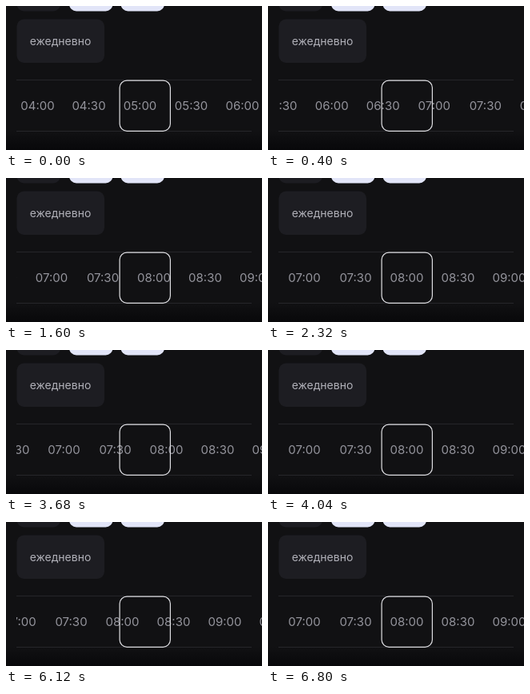
Recreate the animation shown at these times as an HTML page with a canvas. Size 320 px wide and 180 px high, loop 8.76 s.

```html
<!DOCTYPE html>
<html lang="ru">
<head>
<meta charset="utf-8">
<title>Выбор времени</title>
<style>
  html, body { margin: 0; width: 100%; height: 100%; overflow: hidden; background: #111113; }
  canvas { display: block; width: 320px; height: 180px; }
</style>
</head>
<body>
<canvas id="stage"></canvas>
<script>
const W = 320, H = 180, LOOP = 8760, STEP = 40;
const PITCH = 64, CENTER = 173.5, EDGE = 13;
const canvas = document.getElementById('stage');
const ctx = canvas.getContext('2d');
const dpr = window.devicePixelRatio || 1;
canvas.width = W * dpr;
canvas.height = H * dpr;
ctx.scale(dpr, dpr);

const clamp = u => Math.min(1, Math.max(0, u));
const progress = (t, a, b) => clamp((t - a) / (b - a));
const smooth = u => u * u * (3 - 2 * u);
const easeOut = (u, power) => 1 - Math.pow(1 - u, power);

function hermite(u, p0, p1, m0, m1) {
  const u2 = u * u, u3 = u2 * u;
  return (2 * u3 - 3 * u2 + 1) * p0 + (u3 - 2 * u2 + u) * m0
    + (3 * u2 - 2 * u3) * p1 + (u3 - u2) * m1;
}

// Inertial scroll: exponential slowdown that stops once it reaches the slot
const glide = t => Math.max(0, 369 * Math.exp(-t / 500) - 3.55);

// Distance of the 08:00 label from the middle of the frame
function offsetAt(t) {
  const release = 120;
  if (t < release) {
    const speed = -(glide(release) + 3.55) / 500;
    return hermite(t / release, 378, glide(release), -0.3 * release, speed * release);
  }
  if (t < 2320) return glide(t);
  if (t < 3120) return 0;
  if (t < 3600) return 28 * easeOut(progress(t, 3120, 3600), 2);
  if (t < 3680) return 28 - progress(t, 3600, 3680);
  if (t < 5400) return 27 * (1 - smooth(progress(t, 3680, 4040)));
  if (t < 6400) return -28 * easeOut(progress(t, 5400, 6040), 4);
  return -28 * (1 - smooth(progress(t, 6400, 6800)));
}

function label(slot) {
  const minutes = 480 + slot * 30;
  const pad = n => String(n).padStart(2, '0');
  return pad(Math.floor(minutes / 60)) + ':' + pad(minutes % 60);
}

function box(x, y, w, h, r) {
  ctx.beginPath();
  ctx.roundRect(x, y, w, h, r);
}

function card(x, y, w, h, color) {
  box(x, y, w, h, 9);
  ctx.fillStyle = color;
  ctx.fill();
}

function text(str, x, y, size, color) {
  ctx.font = `400 ${size}px Inter, sans-serif`;
  ctx.fillStyle = color;
  ctx.fillText(str, x, y);
}

function drawPanel() {
  ctx.fillStyle = '#111113';
  ctx.fillRect(0, 0, W, H);
  const shade = ctx.createLinearGradient(0, 156, 0, H);
  shade.addColorStop(0, '#111113');
  shade.addColorStop(1, '#08080a');
  ctx.fillStyle = shade;
  ctx.fillRect(0, 156, W, H - 156);

  card(13.5, -40, 54.5, 46.5, '#1d1d22');
  card(79, -40, 54.5, 46.5, '#e2e5f8');
  card(143.5, -40, 54.5, 46.5, '#e2e5f8');
  card(13.5, 16.5, 109.5, 54.5, '#1d1d22');
  text('ежедневно', 68, 48.6, 14, '#b0b0b8');

  ctx.fillStyle = '#26262a';
  ctx.fillRect(EDGE, 92, 294, 1);
  ctx.fillRect(EDGE, 156, 294, 1);
}

function drawTimes(offset) {
  ctx.save();
  ctx.beginPath();
  ctx.rect(EDGE, 93, W - EDGE, 63);
  ctx.clip();
  for (let slot = -9; slot <= 4; slot++) {
    const x = CENTER + offset + slot * PITCH;
    if (x > -30 && x < W + 30) text(label(slot), x, 130.4, 15, '#94949c');
  }
  ctx.restore();
}

function drawFrame() {
  box(142.1, 93.1, 63.3, 63.2, 9);
  ctx.strokeStyle = '#dedee2';
  ctx.lineWidth = 1.2;
  ctx.stroke();
}

function render(now) {
  const t = Math.floor((now % LOOP) / STEP) * STEP;
  ctx.textAlign = 'center';
  ctx.textBaseline = 'alphabetic';
  drawPanel();
  drawTimes(offsetAt(t));
  drawFrame();
  requestAnimationFrame(render);
}
render(0);
</script>
</body>
</html>
```
